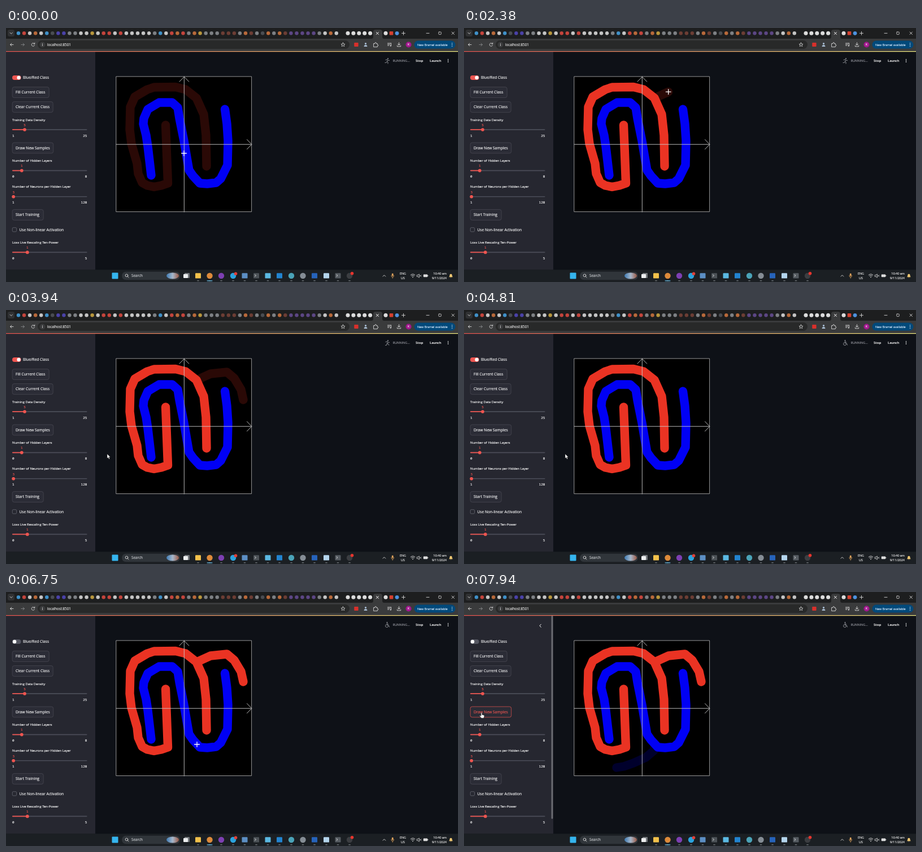
Animation, 800 px wide and 450 px high, one loop 8 s. Source, as an HTML page:

```html
<!DOCTYPE html>
<html lang="en">
<head>
<meta charset="utf-8">
<title>Class painter</title>
<style>
html, body { margin: 0; width: 100%; height: 100%; overflow: hidden; background: #0e1117; }
svg { display: block; width: 100vw; height: 100vh; }
text { font-family: "Open Sans", "Noto Sans", sans-serif; white-space: pre; stroke-width: .14; }
.mono { font-family: "Noto Sans Mono", "DejaVu Sans Mono", monospace; }
.line { fill: none; stroke-linecap: round; stroke-linejoin: round; }
.paint { fill: none; stroke-width: 15.4; stroke-linecap: round; stroke-linejoin: round; }
</style>
</head>
<body>
<svg id="stage" viewBox="0 0 800 450"></svg>
<script>
const LOOP = 8000;
const RED = '#ee5550', WHITE = '#fafafa';
const PAINT_RED = '#ea3323', PAINT_BLUE = '#0000f5';
const svg = document.getElementById('stage');
const $ = id => document.getElementById(id);

// ---- drawing helpers ----
const rect = (x, y, w, h, fill, rx = 0, more = '') =>
  `<rect x="${x}" y="${y}" width="${w}" height="${h}" rx="${rx}" fill="${fill}" ${more}/>`;
const dot = (x, y, r, fill, more = '') =>
  `<circle cx="${x}" cy="${y}" r="${r}" fill="${fill}" ${more}/>`;
const line = (d, color = '#d8d8d8', w = 0.9, more = '') =>
  `<path class="line" d="${d}" stroke="${color}" stroke-width="${w}" ${more}/>`;
const text = (x, mid, s, size, fill = WHITE, more = '') =>
  `<text x="${x}" y="${mid + size * 0.36}" font-size="${size}" fill="${fill}" stroke="${fill}" ${more}>${s}</text>`;
const END = 'text-anchor="end"', MID = 'text-anchor="middle"';

// ---- browser window ----
function tabStrip() {
  const colors = {
    b: '#3f90c8', r: '#c4443c', w: '#c4c4c4', g: '#7d8084', o: '#b8693a',
    p: '#4a41a8', y: '#b8963c', d: '#6c3d34', v: '#5c4684', n: '#4a4d52'
  };
  const row = 'brwowbnppggwwywrrwrwwwwwgbwrorgoygggdddgodgnogodvvvvvgwow';
  let s = rect(0, 0, 800, 19, '#1d1e1f') + rect(3, 3, 12, 12, '#303133', 3) +
    line('M7 8.2l2.2 2.2 2.2-2.2');
  [...row].forEach((c, i) => { s += dot(22 + i * 10.05, 9.3, 3.2, colors[c]); });
  for (let i = 0; i < 5; i++) s += dot(605 + i * 9.9, 9.3, 3.5, '#dcdcdc');
  s += '<path d="M647 19q3 0 3-4V7q0-4 4-4h8q4 0 4 4v8q0 4 3 4z" fill="#3a3b3c"/>' +
    line('M655.4 7.4l4 4m0-4l-4 4', '#fff', 1) +
    dot(672, 9.3, 3.5, '#dcdcdc') + rect(678.7, 6, 6.6, 6.6, '#d5402f', 1) +
    dot(692, 9.3, 3.4, '#4d92df') + line('M700.5 9.3h6m-3-3v6');
  return s + line('M744 9.3h5M789 7l4.4 4.4m0-4.4L789 11.4') +
    `<rect x="765.8" y="7" width="4.4" height="4.4" rx=".8" class="line" stroke="#ddd" stroke-width=".8"/>`;
}

function toolbar() {
  let s = rect(0, 19, 800, 22, '#3a3b3c') + rect(56, 22, 552, 15, '#282929', 7.5) +
    line('M13 29.5H7.5m2.4-2.4l-2.4 2.4 2.4 2.4') +
    line('M27 29.5h5.5m-2.4-2.4l2.4 2.4-2.4 2.4', '#85878a') +
    line('M50.4 28a2.8 2.8 0 1 0 .2 2.6M50.8 26.2v2h-2') +
    dot(64.5, 29.5, 5, '#3a3b3c') + line('M64.5 29v2.4M64.5 27.4v.1') +
    text(73, 29.5, 'localhost:8501', 6.2, '#eee') +
    line('M596.5 26l1 2.3 2.5.2-1.9 1.7.6 2.4-2.2-1.3-2.2 1.3.6-2.4-1.9-1.7 2.5-.2z', '#d8d8d8', 0.8) +
    rect(616.2, 26, 7.4, 7, '#d8302b', 1) + dot(636.5, 27.7, 1.6, '#a8bdd3') +
    '<path d="M633.6 33q0-3 2.9-3t2.9 3z" fill="#a8bdd3"/>' +
    line('M651 27.5h2q0-2 1.2-2t1.2 2h1.8v2q1.7 0 1.7 1.2t-1.7 1.2v1.7H651z') +
    line('M675.5 27h6M675.5 29h4M675.5 31h2.5M681.5 27v4.5') + dot(680.8, 31.6, 1.1, '#d8d8d8') +
    line('M695.5 25.8v4.6m-2.2-2.2l2.2 2.2 2.2-2.2M692.4 31v1.8h6.2V31') +
    dot(712.5, 29.5, 5, '#a3188f') + text(712.5, 29.5, 'K', 5, '#fff', MID) +
    rect(722.4, 22.6, 73, 14, '#00497a', 7) +
    text(728, 29.6, 'New Bramel available', 5.35, '#d3e6fb');
  for (const y of [27, 29.6, 32.2]) s += dot(789.5, y, 0.75, '#d3e6fb');
  return s + rect(0, 41, 800, 1.2, 'url(#strip)');
}

// ---- app ----
const buttons = [
  ['Fill Current Class', 114, 65], ['Clear Current Class', 140, 72],
  ['Draw New Samples', 212.5, 72.5], ['Start Training', 331, 55]
];

function button([label, mid, w], i) {
  return `<g>${rect(11.2, mid - 9.4, w, 18.8, '#2b2c36', 3.2,
    `id="box${i}" stroke-width=".7"`)}${text(17, mid, label, 6.78, WHITE, `id="cap${i}"`)}</g>`;
}

function slider(label, y, value, x, min, max) {
  return text(11, y, label, 5.88) +
    text(x, y + 9.3, value, 6, RED, `class="mono" ${MID}`) +
    rect(11, y + 16.8, 132.5, 1.6, '#4b4d58', 0.8) + rect(11, y + 16.8, x - 11, 1.6, RED, 0.8) +
    dot(x, y + 17.6, 2.9, RED) +
    text(11, y + 27.9, min, 6.1, WHITE, 'class="mono"') +
    text(143.5, y + 27.9, max, 6.1, WHITE, `class="mono" ${END}`);
}

function sidebar() {
  return rect(0, 42, 158, 386.5, '#262730') +
    rect(11, 84, 15.6, 7.9, RED, 3.95, 'id="track"') + dot(22.6, 87.95, 3.2, '#fff', 'id="knob"') +
    text(30, 88, 'Blue/Red Class', 6.7) + buttons.map(button).join('') +
    slider('Training Data Density', 162.5, 5, 33, 1, 25) +
    slider('Number of Hidden Layers', 235, 1, 27.8, 0, 8) +
    slider('Number of Neurons per Hidden Layer', 281.2, 3, 13.2, 1, 128) +
    rect(11.3, 353.7, 7.2, 7.2, '#262730', 1.4, 'stroke="#70727b" stroke-width=".7"') +
    text(23.5, 357.3, 'Use Non-linear Activation', 6.65) +
    slider('Loss Live Rescaling Ten-Power', 379.8, 1, 37.8, 0, 5) +
    `<g id="hoverBar">${line('M136.3 57.2l-2.4 2.6 2.4 2.6', WHITE, 1)}${rect(154.6, 42, 2.8, 360, '#6c6d73', 1.4)}</g>`;
}

function header() {
  const run = legs => dot(676, 54.2, 1, '#9a9ca2') +
    line(`M672 56.6l2.4-.9 1.2.7-1.1 3M675.6 56.4l1.2 1.3 1.8-.4${legs}`, '#9a9ca2', 0.9);
  let s = `<g id="runA">${run('M674.5 59.4l1.6 1.3-.2 2.4M674.5 59.4l-1 1.8-2.6.2')}</g>` +
    `<g id="runB">${run('M674.5 59.4l2.4.8.8 2.1M674.5 59.4l-.8 2.8-2.2.4')}</g>` +
    `<g id="swim">${line('M670 59.6q1.2-1.2 2.4 0t2.4 0 2.4 0 2.4 0M670 62q1.2-1.2 2.4 0t2.4 0 2.4 0 2.4 0M671 54.8l3.4.2 2 2.8', '#9a9ca2')}${dot(677.8, 56, 1, '#9a9ca2')}</g>` +
    `<g id="wheel">${dot(674.5, 54, 1, '#9a9ca2')}${line('M674.4 55.6v3.4h2.8l1.3 3M674.4 57h2.4M672.9 57.5a2.7 2.7 0 1 0 3.8 3.1', '#9a9ca2')}</g>` +
    text(684.5, 58, 'RUNNING...', 5.6, '#92949b') +
    text(725, 58, 'Stop', 6.1, WHITE, 'font-weight="600"') +
    text(750, 58, 'Launch', 5.8, WHITE, 'font-weight="600"');
  for (const y of [55.8, 58, 60.2]) s += dot(782.5, y, 0.8, WHITE);
  return s;
}

const blueD = 'M257 261L251 210 248 190 243 170 244 160 251 144 271 132 294 132 304 141 307 160 315 200 321 235 324 252 331 262 343 275 356 276 372 274 380 267 392 243 393 200 391 170 387.5 144';
const redD = 'M282.5 172L284 210 286.5 275 275 279 262 281.5 250 279 241 274 234 258 232 240 222 205 219 180 220 140 228 122 250 109 262 105 300 104.5 318 109 337 124 350 153 354 190 355 245';
const hookD = 'M340 123L362 113 391 110 404 121 416 141 420 159';
const tailD = 'M338 270L336 281 322 293 300 303 283 309 270 311';
const paint = (id, d, color) => `<path id="${id}" class="paint" d="${d}" stroke="${color}"/>`;

function canvas() {
  return rect(195, 86, 240, 240, '#000') +
    paint('tail', tailD, PAINT_BLUE) + paint('hook', hookD, PAINT_RED) +
    paint('blue', blueD, PAINT_BLUE) + paint('red', redD, PAINT_RED) +
    line('M315.3 86v240M195 206.2h240M307 95l8.3-8.6 8.3 8.6M426.5 197.6l8.3 8.6-8.3 8.6', '#cfcfcf', 0.9) +
    '<rect x="195.2" y="86" width="239.4" height="239.5" class="line" stroke="#a8a8a8" stroke-width=".9"/>';
}

// ---- taskbar ----
function taskbar() {
  let s = rect(0, 428.3, 800, 22, '#1b1f23') + rect(187.5, 433.5, 11, 11, '#35b5ee', 1) +
    rect(205, 431.7, 103, 14.6, '#30353a', 7.3) +
    '<circle cx="213.5" cy="438.4" r="2.3" class="line" stroke="#ddd" stroke-width=".9"/>' +
    line('M215.3 440.2l1.8 1.8') + text(222, 439, 'Search', 6.3, '#cfd2d5') +
    '<ellipse cx="295" cy="439" rx="11" ry="5.5" fill="url(#scene)"/>' +
    rect(316, 434, 9, 9, '#73777b', 1) + rect(314, 436, 8, 7, '#eceeef', 1);
  const apps = [
    [340, '#f2c14b', 1], [360.5, '#dd8a3a', 0], [381, '#7d3fb2', 0], [402, '#2ba3dd', 0],
    [422.5, '#5c8fc4', 1], [443, '#4c5257', 1], [463.5, '#5bb9e2', 1], [484, '#2284d0', 1],
    [505, '#4aa3b8', 0], [525.5, '#858d95', 0], [546, '#2663bb', 1], [567, '#b4d5ed', 1],
    [587.5, '#555b61', 1], [608, '#3b3d41', 0]
  ];
  for (const [x, color, square] of apps) {
    s += square ? rect(x - 5, 434.2, 10, 9.4, color, 1.2) : dot(x, 439, 5.2, color);
    s += rect(x - 1.8, 447.3, 3.6, 1, '#8d9296', 0.5);
  }
  s += rect(355.5, 447.2, 10, 1.2, '#65bde8', 0.6) + dot(406.5, 435.2, 2.8, '#df4038') +
    dot(612.5, 434.8, 2.8, '#e7352e') +
    line('M440.5 437l2 1.6-2 1.6M585 437l2 1.6-2 1.6', '#eee', 0.8) +
    line('M667 440.2l2.4-2.4 2.4 2.4') + rect(682.8, 434.7, 2.8, 5, '#e0a35c', 1.4) +
    line('M681.8 438.6q0 2.8 2.4 2.8t2.4-2.8M684.2 441.4v2', '#e0a35c', 0.8) +
    text(702.5, 435.4, 'ENG', 5.4, '#eee', MID) + text(702.5, 442.6, 'US', 5.4, '#eee', MID) +
    line('M716.2 437.6q3.8-3.4 7.6 0M717.6 439.2q2.4-2.1 4.8 0') + dot(720, 441.3, 0.9, '#ddd') +
    line('M727.6 437.7h1.6l2-1.8v6.4l-2-1.8h-1.6zM732.4 437.8l2.4 2.4m0-2.4l-2.4 2.4', '#ddd', 0.8) +
    rect(738.7, 436.5, 7.4, 4.7, '#ddd', 1) + rect(746.3, 438, 1, 1.8, '#ddd') +
    text(780, 435.3, '10:40 am', 5.5, '#eee', END) + text(780, 442.7, '9/11/2024', 5.5, '#eee', END) +
    '<path d="M784 441.2q1.2-1 1.2-3 0-2.4 2.2-2.4t2.2 2.4q0 2 1.2 3zM786.5 441.8h1.8q-.9 1.4-1.8 0z" fill="#f0c873"/>';
  return s;
}

function pointers() {
  return `<g id="cross">${line('M-4.4 0h8.8M0-4.4v8.8', '#fff', 1.3)}</g>` +
    '<path id="arrow" d="M0 0v8l1.9-1.7 1.3 2.9 1.5-.7-1.3-2.8h2.5z" fill="#fff" stroke="#111" stroke-width=".5"/>' +
    '<path id="hand" d="M-.9.8Q-.9 0 0 0t.9.8v3l3.3.9q1 .3.8 1.4l-.6 2.6q-.2 1.2-1.3 1.2H.2q-.7 0-1.1-.6l-2.3-3q-.3-.7.3-1t1.2.3l.8.7z" fill="#fff" stroke="#111" stroke-width=".5"/>';
}

svg.innerHTML = `<defs>
  <linearGradient id="strip"><stop stop-color="#ee5550"/><stop offset="1" stop-color="#f8f285"/></linearGradient>
  <linearGradient id="scene"><stop stop-color="#3e7bb4"/><stop offset=".5" stop-color="#a6b7ca"/><stop offset="1" stop-color="#9b5945"/></linearGradient>
</defs>` + rect(0, 0, 800, 450, '#0e1117') + sidebar() + header() + canvas() +
  tabStrip() + toolbar() + taskbar() + pointers();

// ---- motion ----
const moves = [
  [0, 315, 222], [150, 315, 222], [900, 340, 120], [1950, 340, 120], [2200, 340, 123],
  [3150, 420, 159], [3850, 179, 255], [4950, 179, 255], [5500, 28.5, 86.5], [5950, 28.5, 86.5],
  [6600, 338, 270], [6820, 338, 270], [7350, 270, 311], [7800, 31, 213.5], [LOOP, 31, 213.5]
];
const strokes = { hook: [2200, 3050], tail: [6820, 7270] };
const clamp = v => Math.max(0, Math.min(1, v));
const ease = u => u * u * (3 - 2 * u);
const show = (id, on) => $(id).setAttribute('visibility', on ? 'visible' : 'hidden');
const set = (id, attrs) => { for (const k in attrs) $(id).setAttribute(k, attrs[k]); };

function pointerAt(t) {
  for (const id in strokes) {
    const [a, b] = strokes[id], path = $(id);
    if (t >= a && t <= b) return path.getPointAtLength(path.getTotalLength() * (t - a) / (b - a));
  }
  const i = Math.max(1, moves.findIndex(m => m[0] > t));
  const [a, x0, y0] = moves[i - 1], [b, x1, y1] = moves[i];
  // after a stroke the pointer rests on its end point
  if (Object.values(strokes).some(s => s[1] >= a && s[1] < b)) return { x: x1, y: y1 };
  const u = ease(clamp((t - a) / (b - a)));
  return { x: x0 + (x1 - x0) * u, y: y0 + (y1 - y0) * u };
}

function drawStroke(id, t) {
  const [a, b] = strokes[id], len = $(id).getTotalLength();
  set(id, { 'stroke-dasharray': `${len * clamp((t - a) / (b - a))} ${len + 20}` });
}

function update(t) {
  // brush strokes are dim until the app hands them back as solid paint
  drawStroke('hook', t);
  drawStroke('tail', t);
  show('red', t < 850 || t >= 1700);
  set('red', { opacity: t < 850 ? 0.18 : 1 });
  show('hook', t >= 2200 && (t < 4350 || t >= 5050));
  set('hook', { opacity: t < 5050 ? 0.18 : 1 });
  show('tail', t >= 6820);
  set('tail', { opacity: 0.18 });

  const p = pointerAt(t);
  const inCanvas = p.x > 195 && p.x < 435 && p.y > 86 && p.y < 326;
  let hot = p.x > 11 && p.x < 77 && Math.abs(p.y - 88) < 5;
  buttons.forEach(([, mid, w], i) => {
    const over = p.x > 11 && p.x < 11 + w && Math.abs(p.y - mid) < 9.4;
    const color = over ? RED : WHITE;
    hot = hot || over;
    set('box' + i, { stroke: over ? RED : '#4c4d56' });
    set('cap' + i, { fill: color, stroke: color });
  });
  const kind = inCanvas ? 'cross' : hot ? 'hand' : 'arrow';
  for (const id of ['cross', 'arrow', 'hand']) show(id, id === kind);
  set(kind, { transform: `translate(${p.x} ${p.y})` });
  show('hoverBar', p.x < 158);

  const off = ease(clamp((t - 5800) / 120));
  set('knob', { cx: 22.6 - 7.5 * off });
  set('track', { fill: off > 0.5 ? '#555762' : RED });

  const mode = t < 900 ? 'run' : t < 1700 ? 'swim' : t < 4350 ? 'run' : 'wheel';
  const step = Math.floor(t / 230) % 2;
  show('runA', mode === 'run' && !step);
  show('runB', mode === 'run' && step);
  show('swim', mode === 'swim');
  show('wheel', mode === 'wheel');
}

const start = performance.now();
function frame() {
  update((performance.now() - start) % LOOP);
  requestAnimationFrame(frame);
}
update(0);
requestAnimationFrame(frame);
</script>
</body>
</html>
```
